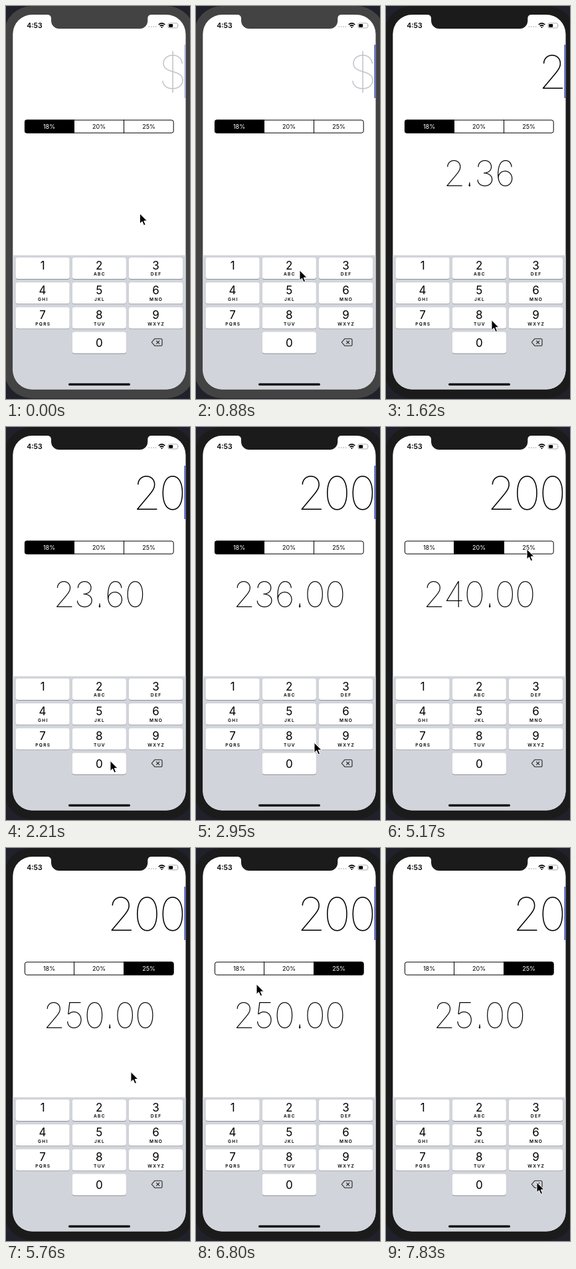
Animation of 277x589 px, one loop 8000 ms. Source, as an HTML page:

```html
<!DOCTYPE html>
<html lang="en">
<head>
<meta charset="utf-8">
<title>Tip calculator</title>
<style>
html, body { margin: 0; width: 100%; height: 100%; overflow: hidden; background: #20212a; }
svg { display: block; width: 277px; height: 589px; font-family: Inter, "Liberation Sans", sans-serif; }
text { text-anchor: middle; }
.thin { font-weight: 100; }
#entry { font-size: 69px; }
#total { font-size: 53px; }
.seg { font-size: 9px; }
.digit { font-size: 17px; }
.letters { font-size: 6.6px; font-weight: 600; letter-spacing: 1.35px; }
</style>
</head>
<body>
<svg viewBox="0 0 277 589">
  <defs>
    <clipPath id="screen"><rect x="10.3" y="13" width="260.2" height="561.5" rx="29"/></clipPath>
    <clipPath id="pill"><rect x="28" y="170.5" width="224.5" height="20" rx="3"/></clipPath>
  </defs>
  <rect id="bezel" x="-3" y="0" width="287" height="588" rx="42"/>
  <g clip-path="url(#screen)">
    <rect width="277" height="589" fill="#fff"/>
    <text id="entry" class="thin"></text>
    <rect id="caret" x="268.4" y="58" width="2.1" height="80" fill="#4a58c6"/>
    <g id="segments" clip-path="url(#pill)"></g>
    <path d="M102.5 170.5v20M177.5 170.5v20" stroke="#000"/>
    <rect x="28.4" y="171" width="223.8" height="19.2" rx="3" fill="none" stroke="#000"/>
    <text id="total" class="thin"></text>
    <path id="point" stroke="#000" stroke-width="1.3"/>
    <rect y="373.5" width="277" height="216" fill="#d1d4da"/>
    <g id="keys"></g>
    <path d="M224 498.7h9.2a1.8 1.8 0 0 1 1.8 1.8v7a1.8 1.8 0 0 1-1.8 1.8H224l-4.7-5.3zM226.3 501.6l4.8 4.8m0-4.8l-4.8 4.8"
      fill="none" stroke="#222" stroke-width="1.1" stroke-linejoin="round"/>
    <rect x="94" y="565.5" width="93" height="3.2" rx="1.6"/>
    <text x="43" y="32.7" font-size="10.5" font-weight="600">4:53</text>
    <g fill="#c4c4c4">
      <circle cx="215.3" cy="31" r="1"/><circle cx="218.7" cy="31" r="1"/>
      <circle cx="222.1" cy="31" r="1"/><circle cx="225.5" cy="31" r="1"/>
    </g>
    <g fill="none" stroke="#000" stroke-width="1.6">
      <path d="M229.7 28q4.8-4.2 9.6 0M231.7 30.1q2.8-2.4 5.6 0"/>
      <path d="M234.5 33.2l-1.5-1.6q1.5-1.1 3 0z" fill="#000" stroke="none"/>
    </g>
    <rect x="244" y="25.7" width="14.6" height="7.2" rx="2" fill="none" stroke="#999" stroke-width=".8"/>
    <path d="M259.6 28v2.6q1.3-1.3 0-2.6" fill="#999"/>
    <rect x="245.2" y="26.9" width="6" height="4.8" rx="1"/>
  </g>
  <path id="notch" d="M62 12.5H219V13Q213.5 13 213.3 18.5V22A12 12 0 0 1 201.5 34H80A12 12 0 0 1 68 22V18.5Q67.8 13 62 13Z"/>
  <path id="cursor" d="M0 0V15.2L3.5 12L6 17.8L8.6 16.7L6.2 11.1H11Z" stroke="#fff" stroke-width="1" stroke-linejoin="round"/>
</svg>
<script>
const LOOP = 8000, STEP = 147.8, LAST = 53;
const $ = id => document.getElementById(id);

function add(parent, tag, attrs, text = '') {
  const el = document.createElementNS('http://www.w3.org/2000/svg', tag);
  for (const name in attrs) el.setAttribute(name, attrs[name]);
  el.textContent = text;
  return parent.appendChild(el);
}

const segments = ['18%', '20%', '25%'].map((label, i) => ({
  box: add($('segments'), 'rect', { x: 27.5 + 75 * i, y: 170, width: 75, height: 21 }),
  text: add($('segments'), 'text', { class: 'seg', x: 65 + 75 * i, y: 184 }, label)
}));

const keys = {};
['', 'ABC', 'DEF', 'GHI', 'JKL', 'MNO', 'PQRS', 'TUV', 'WXYZ', '0'].forEach((letters, i) => {
  const zero = i === 9, col = zero ? 1 : i % 3, row = Math.floor(i / 3);
  const x = 14.5 + 85.2 * col, y = 377 + 37.2 * row, mid = x + 40.6;
  const name = zero ? 0 : i + 1;
  const box = { x, width: 81.2, height: 32, rx: 3.5 };
  add($('keys'), 'rect', { ...box, y: y + 0.9, fill: '#8c8f94' });
  keys[name] = add($('keys'), 'rect', { ...box, y });
  add($('keys'), 'text', { class: 'digit', x: mid, y: y + (zero ? 22 : 17.8) }, name);
  if (!zero) add($('keys'), 'text', { class: 'letters', x: mid + 0.7, y: y + 27.3 }, letters);
});

// Pointer tip: time in ms, x, y
const path = [
  [0, 201.5, 311], [150, 199, 318], [500, 172, 362], [880, 156, 396], [1330, 156, 396],
  [1620, 159, 470], [1920, 157, 502], [2810, 157, 497], [2956, 178, 473], [3240, 172, 330],
  [3540, 149, 183], [4140, 149, 183], [4580, 172, 319], [4880, 206, 205], [5030, 212, 183],
  [5470, 212, 183], [5910, 176, 411], [6210, 140, 370], [6799, 91, 204], [6950, 160, 350],
  [7100, 266, 560], [7240, 250, 549], [7390, 232, 512], [7540, 227, 501], [8000, 227, 501]
];
const entries = [[0, ''], [1320, '2'], [2200, '20'], [2490, '200'], [7670, '20']];
const rates = [[0, 0], [4120, 1], [5460, 2]];
const presses = [[1170, 1320, 2], [2050, 2200, 0], [2350, 2490, 0]];
const touches = [[3830, 4120, 1], [5310, 5460, 2]];

const latest = (list, t) => list.filter(item => item[0] <= t).pop();
const active = (list, t) => (list.find(([from, to]) => t >= from && t < to) || [])[2];

function pointerAt(t) {
  const i = path.findIndex(p => p[0] > t), a = path[i - 1], b = path[i];
  const k = (t - a[0]) / (b[0] - a[0]);
  return [a[1] + (b[1] - a[1]) * k, a[2] + (b[2] - a[2]) * k];
}

function caretAt(t) {
  const since = latest(entries, t)[0] || 2440;
  const phase = ((t - since) % 1000 + 1000) % 1000;
  if (phase < 530) return 1;
  return Math.max(0, 1 - (phase - 530) / 50, (phase - 930) / 70);
}

// Centres each glyph in a cell of Helvetica-like proportions.
function setNumber(el, text, left, cell, y) {
  let x = left, point = null;
  const xs = [...text].map(c => {
    const w = c === '.' ? cell / 2 : cell, mid = x + w / 2;
    if (c === '.') point = mid;
    x += w;
    return mid;
  });
  el.textContent = text;
  el.setAttribute('x', xs.join(' '));
  el.setAttribute('y', y);
  return point;
}

function draw(t) {
  const entry = latest(entries, t)[1], rate = latest(rates, t)[1];
  const shown = entry || '$';
  setNumber($('entry'), shown, 270.2 - 38.6 * shown.length, 38.6, 124);
  $('entry').setAttribute('fill', entry ? '#000' : '#c4c4c9');

  const total = entry && (entry * [1.18, 1.2, 1.25][rate]).toFixed(2);
  const width = 30.5 * (total.length - 0.5);
  const point = setNumber($('total'), total, 141 - width / 2, 30.5, 270);
  $('point').setAttribute('d', point ? `M${point} 264.5v6` : '');

  const touched = active(touches, t), pressed = active(presses, t);
  segments.forEach(({ box, text }, i) => {
    box.setAttribute('fill', i === rate ? '#000' : i === touched ? '#d6d6d6' : '#fff');
    text.setAttribute('fill', i === rate ? '#fff' : '#000');
  });
  for (const name in keys) keys[name].setAttribute('fill', +name === pressed ? '#b3b8c1' : '#fff');

  const body = t < 1170 ? '#434343' : '#1b1b1c';
  $('bezel').setAttribute('fill', body);
  $('notch').setAttribute('fill', body);
  $('caret').setAttribute('opacity', caretAt(t));
  $('cursor').setAttribute('transform', `translate(${pointerAt(t)})`);
}

function run() {
  const t = performance.now() % LOOP;
  draw(Math.min(LAST, Math.floor((t + 22) / STEP)) * STEP);
  requestAnimationFrame(run);
}
run();
</script>
</body>
</html>
```
